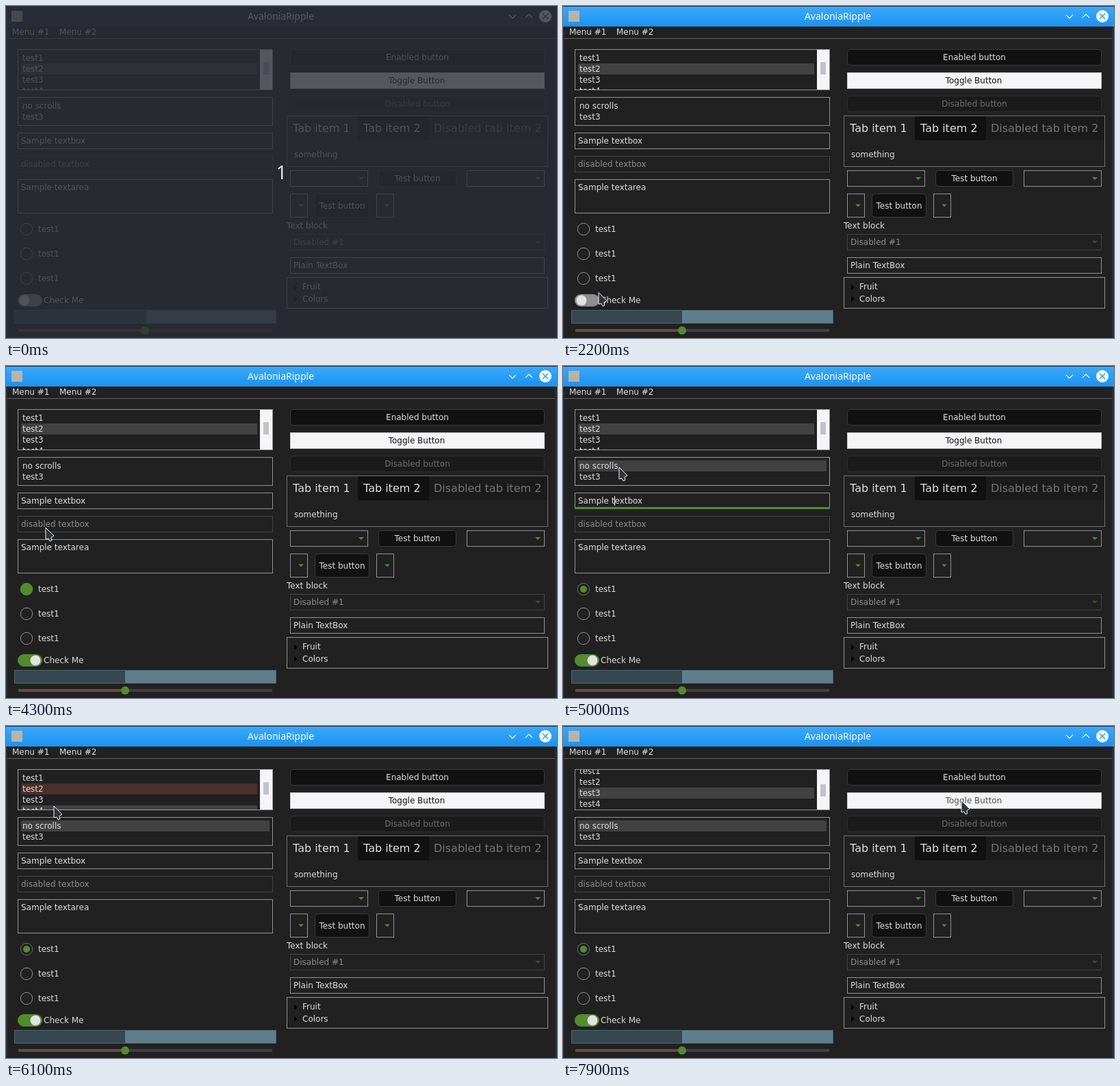
An HTML page that plays this animation: 805x485 px, repeating every 8000 ms.

```html
<!DOCTYPE html>
<html lang="en">
<head>
<meta charset="utf-8">
<title>Ripple controls</title>
<style>
  html, body { margin: 0; width: 100%; height: 100%; overflow: hidden; background: #212121; }
  svg { display: block; }
  text { font: 12px "DejaVu Sans", sans-serif; white-space: pre; }
  .tab { font-size: 16px; }
  .title { font: 14px "Noto Sans", sans-serif; }
  .count { font: 27px "Noto Sans", sans-serif; }
</style>
</head>
<body>
<svg id="stage" width="805" height="485" viewBox="0 0 805 485"></svg>
<script>
const stage = document.getElementById('stage');
const LOOP = 8000, STEP = 100;
const BG = '#212121', INK = '#dedede', DIM = '#757575', GREEN = '#558b2f';
const GREY = '#424242', BROWN = '#4b302b', BROWN_HOVER = '#5d4037';
const LINE = '#929292', LINE_HOVER = '#a0a0a0', LINE_DIM = '#444';

let layer = stage;
function set(node, attrs) {
  for (const key in attrs) node.setAttribute(key, attrs[key]);
  return node;
}
function add(tag, attrs) {
  return layer.appendChild(set(document.createElementNS('http://www.w3.org/2000/svg', tag), attrs));
}
function group(attrs, build) {
  const parent = layer, node = add('g', attrs || {});
  layer = node;
  build();
  layer = parent;
  return node;
}
function clip(id, x, y, width, height) {
  const parent = layer;
  layer = add('clipPath', { id });
  rect(x, y, width, height, '#000');
  layer = parent;
}
const rect = (x, y, width, height, fill, more) => add('rect', { x, y, width, height, fill, ...more });
const box = (x, y, w, h, stroke = LINE, fill = 'none', rx = 0) =>
  rect(x + .5, y + .5, w - 1, h - 1, fill, { stroke, rx });
const circle = (cx, cy, r, fill, more) => add('circle', { cx, cy, r, fill, ...more });
const path = (d, more) => add('path', { d, ...more });
function text(x, y, label, fill = INK, more) {
  const node = add('text', { x, y, fill, ...more });
  node.textContent = label;
  return node;
}
const centered = { 'text-anchor': 'middle' };
function button(x, y, w, h, label, off) {
  box(x, y, w, h, off ? '#2e2e2e' : '#3a3a3a', off ? '#1b1b1b' : '#111', 4);
  text(x + w / 2, y + h / 2 + 4, label, off ? '#6e6e6e' : INK, centered);
}
function combo(x, y, w, h, arrow, stroke) {
  box(x, y, w, h, stroke);
  path(`M${x + w - 14} ${y + h / 2 - 2}h8l-4 4z`, { fill: arrow });
}

// Window and title bar
rect(0, 0, 805, 485, '#292d36');
rect(2, 30, 800, 455, BG);
const gradient = add('linearGradient', { id: 'blue', x2: 0, y2: 1 });
layer = gradient;
add('stop', { offset: 0, 'stop-color': '#38a9fd' });
add('stop', { offset: 1, 'stop-color': '#1c92ef' });
layer = stage;
const activeBar = rect(0, 1, 805, 29, 'url(#blue)');
rect(8, 7, 16, 16, '#b9b3a6');
text(401.5, 20, 'AvaloniaRipple', '#fcfcfc', { class: 'title', ...centered });
const chevron = { fill: 'none', stroke: '#fcfcfc', 'stroke-width': 1.2 };
path('M735 13l5 5 5-5M759 17l5-5 5 5', chevron);
circle(788, 15, 9, '#fcfcfc');
const cross = path('M784 11l8 8m0-8l-8 8', { 'stroke-width': 1.3 });
text(9, 42, 'Menu #1');
text(78, 42, 'Menu #2');
rect(2, 47, 800, 1, '#666');

// Left column
clip('clip1', 18, 64, 353, 58);
clip('clip2', 18, 134, 371, 40);
function list(labels, x, y, width, clipId) {
  const rows = [], ripple = {};
  group({ 'clip-path': `url(#${clipId})` }, () => {
    ripple.scroller = group(null, () => {
      labels.forEach((label, i) => {
        rows.push(rect(x, y + 16 * i, width, 16, 'none'));
        text(x + 2, y + 16 * i + 12, label);
      });
      clip(clipId + 'row', x, y, width, 16);
      ripple.holder = group(null, () => group({ 'clip-path': `url(#${clipId}row)` }, () => {
        ripple.disc = circle(0, y + 8, 0, GREEN, { 'fill-opacity': .34 });
      }));
    });
  });
  return { rows, y, ...ripple };
}
const list1 = list(['test1', 'test2', 'test3', 'test4'], 22, 68, 345, 'clip1');
rect(371, 64, 18, 58, '#f5f5f7');
const scrollThumb = rect(376, 82, 8, 18, '#c2c3c9');
const list2 = list(['no scrolls', 'test3'], 22, 138, 363, 'clip2');

const hoverBoxes = [[17, 63, 373, 60], [17, 133, 373, 42], [17, 185, 373, 24], [17, 253, 373, 50]]
  .map(area => ({ area, node: box(...area) }));
text(22, 201, 'Sample textbox');
const focusMarks = group(null, () => {
  rect(17, 206, 373, 3, GREEN);
  rect(75, 190, 1, 14, '#fff');
});
box(17, 219, 373, 24, LINE_DIM);
text(22, 235, 'disabled textbox', '#8c8c8c');
text(22, 269, 'Sample textarea');

const radios = [326, 362, 398].map(y => {
  const ring = circle(30, y, 8.7, 'none', { stroke: LINE });
  const dot = circle(30, y, 0, GREEN);
  text(47, y + 4, 'test1');
  return { ring, dot };
});
const track = rect(17, 421, 36, 18, '#8e8e8e', { rx: 9 });
const knob = circle(27, 430, 7.5, '#e2e2e2');
text(55, 434, 'Check Me');
rect(12, 444, 383, 20, '#607d8b');
const progress = rect(12, 444, 0, 20, '#37474f');
box(12, 444, 383, 20, '#4c626d');
rect(18, 472, 371, 4, GREY, { rx: 1 });
const trackFill = rect(18, 472, 0, 4, '#6d4c41', { rx: 1 });
const sliderThumb = circle(0, 474, 6, GREEN);

// Right column
button(415, 63, 372, 24, 'Enabled button');
box(415, 97, 372, 24, '#ccc', '#f5f5f7');
const toggleText = text(600, 113, 'Toggle Button', '#111', centered);
clip('clip3', 415, 97, 372, 24);
let toggleRipple;
group({ 'clip-path': 'url(#clip3)' }, () => {
  toggleRipple = circle(582, 109, 0, GREEN, { 'fill-opacity': .32 });
});
button(415, 131, 372, 24, 'Disabled button', true);
rect(514, 161, 104, 35, '#111');
rect(618, 161, 173, 35, '#1b1b1b');
box(410, 160, 382, 75, '#6e6e6e');
text(419, 184, 'Tab item 1', INK, { class: 'tab' });
text(522, 184, 'Tab item 2', INK, { class: 'tab' });
text(625, 184, 'Disabled tab item 2', DIM, { class: 'tab' });
text(421, 221, 'something');
combo(415, 240, 114, 24, '#4f9227');
button(544, 240, 114, 24, 'Test button');
combo(673, 240, 114, 24, '#4f9227');
combo(415, 274, 26, 35, '#767b1c');
button(451, 274, 80, 35, 'Test button');
combo(541, 274, 26, 35, '#3e8a35');
text(410, 325, 'Text block');
combo(415, 333, 372, 24, '#4a4a22', LINE_DIM);
text(420, 349, 'Disabled #1', '#8c8c8c');
box(415, 367, 372, 24);
text(420, 383, 'Plain TextBox');
box(410, 396, 382, 46);
path('M421 407l5 4-5 4zM421 424l5 4-5 4z', { fill: '#000' });
text(433, 414, 'Fruit');
text(433, 432, 'Colors');

const cursor = path('M0 0V17L4 16.2 6 20 9 18.7 7.8 14.6 12 12Z',
  { fill: '#31363b', stroke: '#f4f4f4', 'stroke-linejoin': 'round' });

const countdown = group(null, () => {
  rect(0, 0, 805, 485, '#292d36', { 'fill-opacity': .79 });
  text(402.5, 253, '1', '#e6e6e6', { class: 'count', ...centered });
});

// Motion tables: time, then values
const CURSOR = [
  [500, 245, 486], [800, 220, 472], [1000, 220, 472], [1100, 225, 472], [1300, 236, 471],
  [1500, 205, 471], [1700, 178, 473], [1800, 165, 470], [2100, 60, 413], [2300, 44, 424],
  [2500, 44, 424], [3300, 36, 362], [3500, 36, 362], [3900, 32, 327], [4100, 32, 326],
  [4300, 58, 236], [4500, 75, 199], [4700, 75, 197], [5000, 82, 148], [5100, 82, 146],
  [5200, 76, 120], [5400, 70, 91], [5700, 70, 91], [6100, 70, 117], [6500, 70, 117],
  [6700, 67, 97], [6900, 67, 95], [7000, 67, 95], [7200, 540, 108], [7300, 582, 109]
];
const SLIDER = [[1000, 203], [1100, 208], [1300, 222], [1500, 205], [1700, 176], [1800, 174]];
const RADIO1 = [[4000, 0], [4200, 9], [4300, 9], [4400, 5]];
const RADIO2 = [[3200, 0], [3400, 9], [3600, 5], [4000, 5], [4100, 0]];

function at(table, t) {
  const next = table.findIndex(row => row[0] > t);
  if (next === 0) return table[0].slice(1);
  if (next < 0) return table[table.length - 1].slice(1);
  const a = table[next - 1], b = table[next], k = (t - a[0]) / (b[0] - a[0]);
  return a.slice(1).map((v, i) => v + (b[i + 1] - v) * k);
}
const clamp = v => Math.max(0, Math.min(1, v));
const between = (t, from, to) => t >= from && t < to;

function paintRows({ rows, y }, mouse, selected, focused) {
  rows.forEach((row, i) => {
    const hover = mouse !== null && Math.floor((mouse - y) / 16) === i;
    let fill = hover ? GREY : 'none';
    if (i === selected) fill = !focused ? GREY : hover ? BROWN_HOVER : BROWN;
    set(row, { fill });
  });
}
function paintRipple(target, t, presses) {
  const press = presses.find(p => between(t, p.start, p.end));
  set(target.disc, { r: press ? (t - press.start) / 2 : 0, cx: press ? press.x : 0 });
  if (press) set(target.holder, { transform: `translate(0 ${16 * press.row})` });
}

function draw(t) {
  const [mx, my] = at(CURSOR, t);
  const inside = ([x, y, w, h]) => t >= 500 && mx >= x && mx < x + w && my >= y && my < y + h;

  set(countdown, { opacity: clamp((800 - t) / 500) });
  const active = clamp((t - 900) / 200);
  set(activeBar, { opacity: active });
  set(cross, { stroke: active ? '#1d99f3' : '#292d36' });
  set(cursor, { transform: `translate(${mx} ${my})`, opacity: t < 500 ? 0 : 1 });

  const [thumb] = at(SLIDER, t);
  set(sliderThumb, { cx: thumb });
  set(trackFill, { width: thumb - 18 });
  set(progress, { width: 162 + (thumb - 174) * 1.06 });

  const on = clamp((t - 2200) / 200);
  set(track, { fill: on >= .5 ? GREEN : '#8e8e8e' });
  set(knob, { cx: 27 + 16 * on });
  [RADIO1, RADIO2].forEach((table, i) => {
    const [r] = at(table, t);
    set(radios[i].dot, { r });
    set(radios[i].ring, { stroke: r ? '#6e6e6e' : LINE });
  });

  hoverBoxes.forEach(({ area, node }) => set(node, { stroke: inside(area) ? LINE_HOVER : LINE }));
  set(focusMarks, { opacity: between(t, 4600, 5100) ? 1 : 0 });

  const scroll = t >= 6400 ? 10 : 0;
  set(list1.scroller, { transform: `translate(0 ${-scroll})` });
  set(scrollThumb, { y: scroll ? 85 : 82 });
  const selected1 = t < 6400 ? 1 : t < 6700 ? 3 : 2;
  paintRows(list1, inside(hoverBoxes[0].area) ? my + scroll : null, selected1, between(t, 5700, 7300));
  paintRows(list2, inside(hoverBoxes[1].area) ? my : null, t >= 5100 ? 0 : -1, between(t, 5100, 5700));
  paintRipple(list1, t, [
    { start: 5650, end: 5900, x: 70, row: 1 },
    { start: 6350, end: 6600, x: 70, row: 3 },
    { start: 6752, end: 7100, x: 67, row: 2 }
  ]);
  paintRipple(list2, t, [{ start: 5050, end: 5300, x: 82, row: 0 }]);

  set(toggleText, { fill: inside([415, 97, 372, 24]) ? '#505050' : '#111' });
  set(toggleRipple, { r: between(t, 7300, 7900) ? Math.min(t - 7250, 450) / 2 : 0 });
}

const start = performance.now();
function tick() {
  const t = (performance.now() - start) % LOOP;
  draw(Math.floor(t / STEP) * STEP);
  requestAnimationFrame(tick);
}
tick();
</script>
</body>
</html>
```
